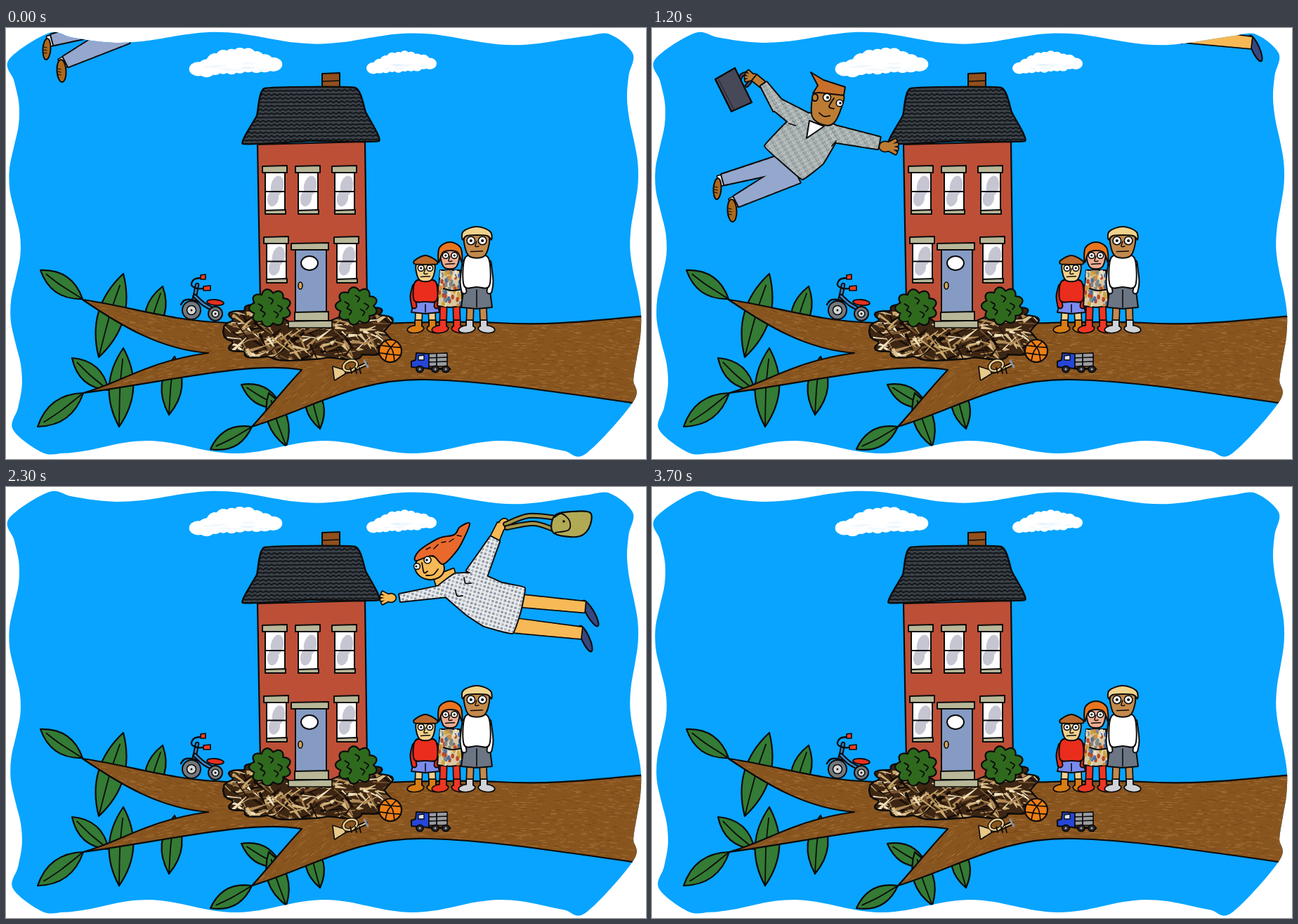
An HTML page with a canvas for the animation above (3.8 s loop, 911 px wide and 614 px high).

```html
<!DOCTYPE html>
<html lang="en">
<head>
<meta charset="utf-8">
<title>House on a branch</title>
<style>
html, body { margin: 0; width: 100%; height: 100%; overflow: hidden; background: #fff; }
canvas { display: block; width: 911px; height: 614px; }
</style>
</head>
<body>
<canvas id="stage" width="911" height="614"></canvas>
<script>
const W = 911, H = 614, LOOP = 3800, STEP = 100;
const INK = '#0b0b0b', TRIM = '#b8b798', TAU = Math.PI * 2;
const { sin, cos, abs, sign, sqrt, exp, atan2, hypot } = Math;
const stage = document.getElementById('stage').getContext('2d');
let g, seed = 7;

const rnd = (a, b) => {
  seed = (seed * 16807) % 2147483647;
  return a + (b - a) * seed / 2147483647;
};
const pick = list => list[Math.floor(rnd(0, list.length))];

function layer(draw) {
  const c = document.createElement('canvas');
  c.width = W; c.height = H;
  g = c.getContext('2d');
  g.lineJoin = g.lineCap = 'round';
  draw();
  return c;
}

// Path builders. In trace, k = 0 gives straight sides.
function trace(p, k = 0, open = false) {
  const n = p.length / 2, path = new Path2D();
  const at = i => {
    i = open ? Math.max(0, Math.min(n - 1, i)) : (i + n) % n;
    return [p[2 * i], p[2 * i + 1]];
  };
  path.moveTo(p[0], p[1]);
  for (let i = 0; i < (open ? n - 1 : n); i++) {
    const a = at(i - 1), b = at(i), c = at(i + 1), d = at(i + 2);
    path.bezierCurveTo(b[0] + (c[0] - a[0]) * k, b[1] + (c[1] - a[1]) * k,
      c[0] - (d[0] - b[0]) * k, c[1] - (d[1] - b[1]) * k, c[0], c[1]);
  }
  if (!open) path.closePath();
  return path;
}
function taper(x, y, x2, y2, w, w2 = w) {
  const a = atan2(y2 - y, x2 - x), nx = -sin(a) / 2, ny = cos(a) / 2;
  return trace([x + nx * w, y + ny * w, x2 + nx * w2, y2 + ny * w2,
    x2 - nx * w2, y2 - ny * w2, x - nx * w, y - ny * w]);
}
function ring(x, y, rx, ry = rx, turn = 0) {
  const p = new Path2D();
  p.ellipse(x, y, rx, ry, turn, 0, TAU);
  return p;
}
function lobed(x, y, rx, ry, lobes, depth, square = 1) {
  const p = [], pull = v => sign(v) * abs(v) ** square;
  for (let a = 0; a < TAU; a += TAU / 90) {
    const r = 1 - depth * (1 - abs(sin(a * lobes / 2)));
    p.push(x + rx * r * pull(cos(a)), y + ry * r * pull(sin(a)));
  }
  return trace(p);
}

function paint(path, fill, w = 2, ink = INK) {
  if (fill) { g.fillStyle = fill; g.fill(path); }
  if (w) { g.lineWidth = w; g.strokeStyle = ink; g.stroke(path); }
  return path;
}
// Several parts under one common outline.
function merge(parts, fill, w = 3.4) {
  parts.forEach(p => paint(p, null, w));
  parts.forEach(p => paint(p, fill, 0));
}
const poly = (p, fill, w) => paint(trace(p), fill, w);
const blob = (p, fill, w) => paint(trace(p, 1 / 6), fill, w);
const line = (p, w = 1.8, ink = INK) => paint(trace(p, 1 / 6, true), null, w, ink);
const box = (x, y, x2, y2, fill, w) => poly([x, y, x2, y - 1, x2, y2, x, y2], fill, w);
const oval = (x, y, rx, ry, fill, w, turn) => paint(ring(x, y, rx, ry, turn), fill, w);
const dot = (x, y, r, fill = INK) => oval(x, y, r, r, fill, 0);
function tube(p, w, color) { line(p, w + 4); line(p, w, color); }
function within(path, fn) { g.save(); g.clip(path); fn(); g.restore(); }
function eye(x, y, r, look = 0) {
  oval(x, y, r, r, '#fff', 1.6);
  dot(x + look, y, r * .36);
}
function hand(x, y, angle, size, skin) {
  const parts = [ring(x, y, size * .5, size * .42, angle)];
  for (let i = -1.5; i < 2; i++) {
    const a = angle + i * .36;
    parts.push(taper(x, y, x + size * 1.15 * cos(a), y + size * 1.15 * sin(a), size * .36, size * .22));
  }
  merge(parts, skin);
}

// Wavy edge of the picture: one cosine per side, rounded at the corners.
function edge() {
  const p = [], wave = (v, amp, peak, period) => amp * cos(TAU * (v - peak) / period);
  for (let x = 60; x <= 860; x += 32) p.push(x, 12 + x * .006 + wave(x, 8, 160, 281));
  for (let y = 36; y <= 535; y += 31) p.push(889 + y * .02 + wave(y, 7, 205, 210), y);
  for (let x = 826; x >= 45; x -= 31) p.push(x, 597 + wave(x, 9, 75, 252));
  for (let y = 572; y >= 44; y -= 31) p.push(10 + y * .01 + wave(y, 8, 120, 190), y);
  return trace(p, 1 / 6);
}
const frame = edge();

function cloud(x, y, w, h) {
  for (let i = 0; i < 10; i++) {
    const u = i / 9, hump = sin(Math.PI * u);
    oval(x + w * (.09 + .82 * u), y + h * (.74 - .2 * u - .22 * hump + rnd(-.04, .04)),
      w * .1, h * (.24 + .2 * hump), '#fff', 0);
  }
  for (let i = 0; i < 8; i++)
    oval(x + w * rnd(.15, .85), y + h * rnd(.5, .75), w * rnd(.04, .1), 1.5, 'rgba(205,230,250,.25)', 0);
}

function leaf(x, y, x2, y2) {
  const d = hypot(x2 - x, y2 - y), w = 12 + d * .2;
  const mx = (x + x2) / 2, my = (y + y2) / 2, nx = (y - y2) / d * w, ny = (x2 - x) / d * w;
  paint(new Path2D(`M${x} ${y}Q${mx + nx} ${my + ny} ${x2} ${y2}Q${mx - nx} ${my - ny} ${x} ${y}`), '#347b35', 2.2);
  line([x + (x2 - x) * .14, y + (y2 - y) * .14, mx + nx * .05, my + ny * .05, x2, y2]);
}

function branch() {
  const wood = new Path2D('M109 387C180 397 230 417 315 420C520 426 620 415 700 420S850 415 912 410V537' +
    'C760 515 680 503 600 501C500 498 440 540 350 568C375 541 390 520 421 487' +
    'C350 475 250 500 110 520C165 505 200 475 288 463C220 458 165 425 109 387Z');
  paint(wood, '#89551f', 0);
  within(wood, () => {
    for (let i = 0; i < 4200; i++) {
      const x = rnd(105, 910), y = rnd(384, 570), n = rnd(3, 9);
      const slope = x < 300 ? (y < 464 ? .26 : -.26) : x < 480 && y > 486 ? -.8 : (x - 620) * .00025;
      line([x, y, x + n, y + n * slope], .8, pick(['#a06c32', '#ab783f', '#75441a', '#7e4c1b']));
    }
  });
  paint(wood, null, 2.2);
}

function nest() {
  const p = lobed(431, 432, 122, 42, 13, .12, .62);
  paint(p, '#3d2613', 0);
  within(p, () => {
    for (let i = 0; i < 330; i++) {
      const x = rnd(300, 550), y = rnd(385, 478), a = rnd(-.9, 1.2), n = rnd(8, 34);
      paint(taper(x, y, x + n * cos(a), y + n * sin(a), rnd(1, 6), 1),
        pick(['#dcc08c', '#b08a55', '#f0e1bd', '#1d110a', '#120b07', '#7a5530', '#c9a76c']), 0);
    }
  });
  paint(p, null, 2.4);
}

function pane(x, y, h) {
  const x2 = x + 28, m = x + 14;
  box(x, y, x2, y + h, '#fff');
  oval(m + 3, y + h * .35, 9, h * .27, '#c6c6d3', 0, .2);
  oval(m - 3, y + h * .66, 8, h * .22, '#c6c6d3', 0, .2);
  line([x, y + h * .49, x2, y + h * .49], 2);
  box(x - 4, y - 9, x2 + 3, y, TRIM);
  box(x, y + h - 1, x2 + 1, y + h + 4, TRIM);
}
function bush(x, y) {
  paint(lobed(x, y, 30, 27, 9, .2), '#2f691d', 2.2);
  for (let i = 0; i < 5; i++) {
    const px = x + 14 * cos(i * 2.4), py = y + 11 * sin(i * 2.4);
    line([px - 3, py - 4, px + 3, py, px, py + 5]);
  }
}
function house() {
  poly([358,166, 511,162, 514,395, 462,417, 405,420, 362,392], '#bd4f37', 2.2);
  box(450, 65, 475, 88, '#91501d');
  line([451,76, 475,75], 1.6);
  const roof = trace([368,86, 497,85, 512,120, 531,161, 433,161, 337,165, 357,125], .06);
  paint(roof, '#3c4249', 0);
  within(roof, () => {
    for (let y = 90; y < 168; y += 5.4) {
      const p = [];
      for (let x = 334; x < 536; x += 4) p.push(x, y + sin(x * .8 + y) * 1.2 - (x - 334) * .008);
      line(p, 2.3, '#15191d');
    }
  });
  paint(roof, null, 2.4);
  for (const x of [369, 416, 468]) pane(x, 206, 55);
  for (const x of [371, 471]) pane(x, 307, 52);
  box(412, 316, 456, 406, '#859bc3');
  oval(432, 335, 12, 10, '#fff');
  oval(419, 367, 3, 5, '#d8a552', 1.6);
  box(406, 307, 459, 316, TRIM);
  box(402, 418, 464, 427, TRIM, 1.6);
  box(411, 405, 459, 417, TRIM);
  bush(376, 399);
  bush(499, 396);
}

function trike() {
  tube([264,400, 269,381, 272,366], 2.5, '#3c83c6');
  tube([269,382, 281,393, 297,402], 2.5, '#3c83c6');
  for (const [x, y, r] of [[264,402,13], [298,407,10]]) {
    oval(x, y, r, r, '#74797f');
    oval(x, y, r * .5, r * .5, '#d6d8d8', 1.6);
    dot(x, y, 1.5);
  }
  line([249,394, 254,388, 264,387, 274,390], 2.5);
  line([278,356, 268,358, 264,366, 272,371, 282,371], 2.4);
  box(277, 352, 284, 358, '#ee3b22', 1.6);
  box(281, 368, 291, 374, '#ee3b22', 1.6);
  oval(298, 391, 12, 4, '#e5301f', 1.8, .1);
}

// One standing child, built from the heights of its parts.
function kid(x, k) {
  const { top, face, r, waist, hem, w, skin, hair, shirt, shorts, shoe, lock, boot } = k;
  const brow = face - r * .55, neck = face + r * 1.25;
  for (const s of [-1, 1]) {
    merge([taper(x + s * 9, hem - 4, x + s * 10, 424, 8)], boot ? shoe : skin);
    if (shoe) merge([ring(x + s * 14, 429, 11, 4.5, s * .12), taper(x + s * 10, 428, x + s * 10, 417, 8)], shoe);
  }
  const bottom = poly([x - w + 2, waist, x + w - 2, waist, x + w + 2, hem, x, hem + 2, x - w - 2, hem], shorts);
  if (boot) within(bottom, () => {
    for (let i = 0; i < 70; i++)
      oval(rnd(x - 18, x + 18), rnd(waist, hem), 2.2, 3.4,
        pick(['#d98b3c', '#e8e0cc', '#7d8a8a', '#b8482c', '#cfa53c', '#4b6da0']), 0);
  });
  if (boot) line([x - 9, 371, x + 2, 374, x + 19, 372], 2.2);
  else {
    line([x, waist + 6, x, hem], 1.6);
    for (const s of [-1, 1]) tube([x + s * (w - 3), neck + 8, x + s * w, waist - 6, x + s * (w - 2), waist + 8], 5, shirt);
    blob([x - w + 3, neck + 2, x, neck - 2, x + w - 3, neck + 2, x + w - 2, waist, x, waist + 2, x - w + 2, waist], shirt);
  }
  blob([x - r, brow, x, brow - 6, x + r, brow, x + r - 1, face + r * .6, x + r * .5, neck, x - r * .5, neck, x - r + 1, face + r * .6], skin);
  blob([x - r - 3, brow + lock, x - r - 2, brow - 6, x, top, x + r + 2, brow - 6, x + r + 4, brow + lock,
    x + r - 3, brow, x - r + 4, brow], hair);
  eye(x - r * .48, face - 2, r * .34);
  eye(x + r * .48, face - 2, r * .34);
  line([x, face - 1, x - 2, face + 6, x + 3, face + 6], 1.5);
  line([x - r * .5, face + r * .8, x + r * .5, face + r * .75], 1.5);
}

function toys() {
  oval(547, 460, 16, 16, '#ed7d14', 2.2);
  for (const y of [452, 463]) line([533, y, 547, y + 2, 562, y + 3], 1.7);
  line([540,446, 550,459, 553,475], 1.7);
  line([555,447, 544,460, 540,474], 1.7);
  tube([475,491, 492,488, 512,479], 2, '#e8c98a');
  merge([taper(467, 492, 482, 490, 18, 4)], '#e8c98a');
  for (const w of [5, 2.6]) paint(ring(490, 481, 10, 7, -.4), null, w, w > 4 ? INK : '#e8c98a');
  for (const x of [490, 497, 503]) line([x, 484, x + 2, 492]);
  line([510,474, 515,483], 3, '#8c93a0');
  poly([584,463, 602,464, 602,485, 577,483, 577,475, 583,473], '#2546d8');
  box(587, 467, 595, 473, '#dbe6fb', 1.4);
  for (const y of [464, 470, 476]) box(602, y, 628, y + 6, '#9a9ca1', 1.6);
  line([613,464, 613,482]);
  line([602,485, 632,486], 3);
  for (const x of [589, 611, 626]) { oval(x, 486, 5, 4.5, '#2b2b30'); dot(x, 486, 1.5, '#aaa'); }
}

const scene = layer(() => {
  g.fillStyle = '#fff';
  g.fillRect(0, 0, W, H);
  paint(frame, '#08a4ff', 0);
  within(frame, () => {
    cloud(262, 29, 130, 42);
    cloud(514, 33, 98, 34);
    leaf(167,350, 132,469); leaf(223,368, 202,440);
    leaf(94,470, 146,516); leaf(167,456, 161,568); leaf(240,468, 232,551);
    leaf(335,508, 392,540); leaf(374,520, 399,596); leaf(432,506, 447,571);
    branch();
    leaf(49,345, 109,386); leaf(45,568, 110,520); leaf(291,600, 350,568);
    trike();
    nest();
    house();
    kid(597, { top: 324, face: 344, r: 13, waist: 388, hem: 405, w: 18, lock: -1,
      skin: '#f3d18c', hair: '#b9692c', shirt: '#ea2d1d', shorts: '#7b8bee', shoe: '#d97c12' });
    kid(632, { top: 305, face: 326, r: 13, waist: 345, hem: 396, w: 16, lock: 15, boot: true,
      skin: '#ecab90', hair: '#e8751f', shorts: '#d9c8a0', shoe: '#ee3524' });
    kid(670, { top: 283, face: 305, r: 17, waist: 367, hem: 398, w: 20, lock: 6,
      skin: '#c48a4c', hair: '#efd28c', shirt: '#fff', shorts: '#6c7583', shoe: '#cfd2d6' });
    toys();
  });
});

function knit() {
  for (let y = 115; y < 262; y += 5)
    for (let x = 130 + y % 2 * 3; x < 308; x += 6)
      line([x - 2, y - 1, x, y + 1.5, x + 2, y - 1], 1, (x + y) % 4 < 2 ? '#737f80' : '#d0d6d4');
}
function dots() {
  for (let i = -6; i < 45; i++)
    for (let j = -12; j < 34; j++)
      dot(590 + i * 5.4 - j * 1.5, 110 + i * 1.6 + j * 5.4, 1.9, (i * 3 + j) % 4 ? '#939cad' : '#b2bac4');
}

const man = layer(() => {
  const skin = '#bc7c34', leather = '#ad681c';
  merge([taper(74, 260, 86, 257, 14)], '#fff');
  merge([taper(92, 292, 104, 286, 14)], '#fff');
  oval(72, 271, 5.5, 15, leather, 2, .06);
  oval(93, 302, 6.5, 16, leather, 2, -.06);
  for (let i = 0; i < 3; i++) {
    line([68, 268 + i * 4, 72, 269 + i * 4], 1.2);
    line([88, 299 + i * 4, 92, 300 + i * 4], 1.2);
  }
  merge([taper(168, 234, 80, 258, 25, 15), taper(182, 247, 99, 289, 34, 16)], '#95a7cd', 4);
  tube([104,115, 107,109, 115,107, 119,117, 114,124], 2, '#50526a');
  hand(125, 113, 3.4, 12, skin);
  merge([taper(125, 113, 136, 122, 10)], skin);
  poly([69,115, 97,99, 121,148, 92,161], '#474959', 2.4);
  line([74,116, 95,157], 1.5, '#2a2b36');
  hand(311, 211, 0, 16, skin);
  const sweater = [
    trace([172,176, 207,163, 241,182, 240,204, 222,235, 193,257, 160,229, 140,210], .04),
    taper(138, 122, 160, 155, 10, 19), taper(157, 151, 195, 176, 18, 28), taper(230, 191, 302, 206, 24, 17)];
  merge(sweater, '#a8b1b0', 4);
  sweater.forEach(p => within(p, knit));
  line([174,178, 183,181]);
  line([241,203, 235,210]);
  poly([203,174, 199,199, 224,182], '#fff');
  blob([210,136, 206,164, 214,176, 229,181, 239,176, 247,160, 252,138, 232,132], skin);
  oval(211, 141, 4, 5, skin);
  poly([208,135, 215,124, 205,105, 223,116, 254,126, 252,138, 217,134], '#c8702a');
  eye(228, 141, 5.5, 1);
  eye(246, 149, 4.8, 1);
  line([238,142, 231,154, 238,157]);
  line([217,163, 224,168, 232,167]);
});

const woman = layer(() => {
  const skin = '#f6b956', navy = '#36467f', strap = '#a49449';
  oval(866, 203, 21, 5.5, navy, 2, 1.05);
  oval(859, 239, 20, 5.5, navy, 2, 1.15);
  merge([taper(765, 185, 858, 194, 17, 15)], skin);
  merge([taper(755, 220, 853, 231, 20, 16)], skin);
  merge([taper(729, 98, 739, 76, 13, 11), ring(742, 76, 6, 8, .5)], skin);
  tube([745,76, 778,64, 817,67], 4, strap);
  tube([747,81, 785,75, 815,84], 4, strap);
  blob([815,64, 840,58, 866,60, 863,83, 846,94, 813,88], '#b2a954', 2.2);
  line([815,66, 825,61, 836,71, 835,84, 816,88]);
  dot(828, 72, 1.8);
  hand(582, 181, 3.14, 13, skin);
  merge([taper(645, 158, 674, 149, 16, 20)], skin);
  const dress = [
    trace([650,164, 673,147, 708,146, 740,160, 772,167, 766,200, 755,231, 715,221, 690,205, 660,179], .04),
    taper(665, 170, 595, 181, 17, 10), taper(703, 149, 730, 97, 30, 14)];
  merge(dress, '#e9ebea', 4);
  dress.forEach(p => within(p, dots));
  line([686,152, 688,160, 696,160]);
  line([674,170, 676,178, 684,178]);
  oval(637, 138, 21, 17, skin, 2, .15);
  blob([617,128, 622,114, 650,96, 672,91, 680,80, 694,75, 684,100, 674,116, 656,133, 641,121], '#e9692c');
  for (let i = 0; i < 5; i++) line([632 + i * 11, 112 - i * 5 + i % 2 * 4, 638 + i * 11, 109 - i * 4], 1.5);
  eye(619, 136, 4.4, -1);
  eye(634, 127, 5, -1);
  line([626,131, 629,145, 634,143]);
  line([632,149, 642,148, 649,140]);
});

// A flyer drops in, levels out at time "at" and climbs away; u counts steps from there.
const flyers = [
  { art: man, at: 885, fall: [40, 3.5], rise: [35, 3.5], lead: -14, drift: [0, 2.1] },
  { art: woman, at: 1950, fall: [44, 3.5], rise: [32, 8], lead: 0, drift: [-6, -1.05] }
];
function place({ at, fall, rise, lead, drift }, t) {
  const u = (t - at) / 100, [speed, round] = u < 0 ? fall : rise;
  return [
    u < 0 ? lead * (1 - exp(u / 2)) : drift[0] * u + drift[1] * u * u,
    -speed * (sqrt(u * u + round * round) - round)
  ];
}

function draw() {
  const t = Math.floor(performance.now() % LOOP / STEP) * STEP;
  stage.drawImage(scene, 0, 0);
  stage.save();
  stage.clip(frame);
  for (const f of flyers) {
    const [x, y] = place(f, t);
    stage.drawImage(f.art, Math.round(x), Math.round(y));
  }
  stage.restore();
  requestAnimationFrame(draw);
}
draw();
</script>
</body>
</html>
```
